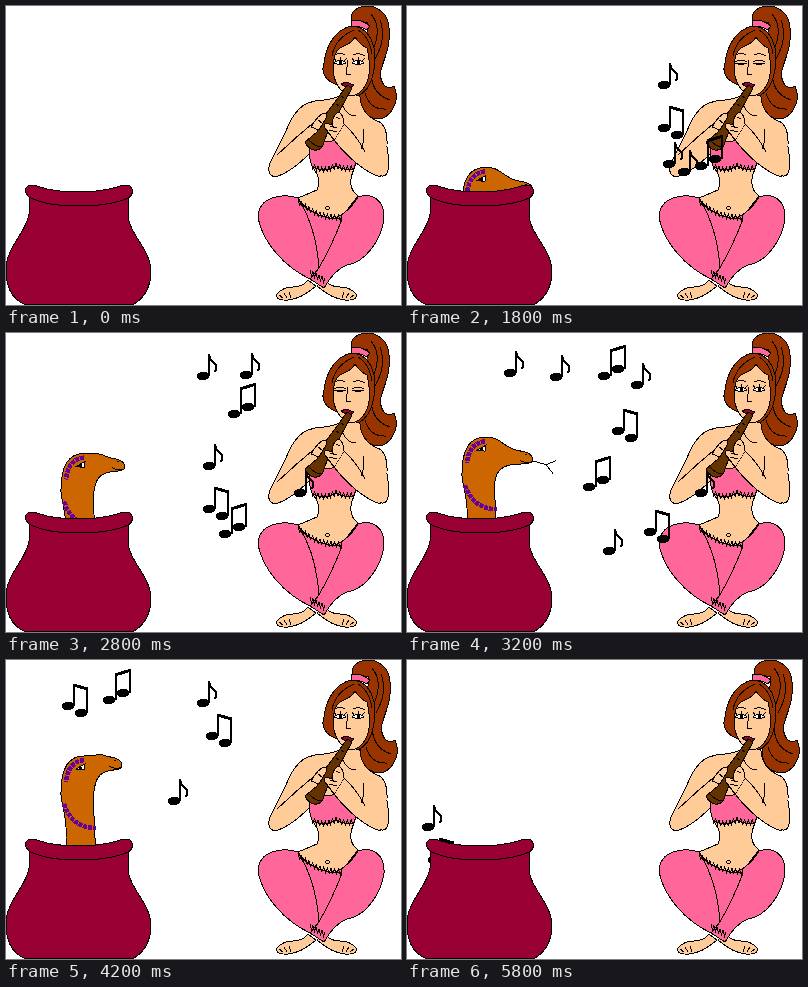
Write an HTML page that moves like this. It is 395 px wide and 299 px high and loops after 6000 ms.

```html
<!DOCTYPE html>
<html lang="en">
<head>
<meta charset="utf-8">
<title>Snake charmer</title>
<style>
  html, body { margin: 0; width: 100%; height: 100%; overflow: hidden; background: #fff; }
  svg { display: block; width: 100%; height: 100%; }
  path, ellipse, circle { stroke: #000; shape-rendering: crispEdges; }
  .skin { fill: #fc9; }
  .pink { fill: #f69; }
  .hair { fill: #930; }
  .wood { fill: #630; }
  .pot { fill: #903; }
  .snake { fill: #c60; }
  .white { fill: #fff; }
  .line { fill: none; }
  .strand { fill: none; stroke: #609; stroke-width: 4.5; stroke-dasharray: 4 1; }
  .note path { fill: none; stroke-width: 2; }
  .note .beam { stroke-width: 3; }
</style>
</head>
<body>
<svg viewBox="0 0 395 299" preserveAspectRatio="none">
  <defs>
    <ellipse id="head" rx="6" ry="3.8" transform="rotate(-8)"/>
    <g id="single" class="note">
      <use href="#head"/>
      <path d="M6 0V-22Q7 -15 11 -13T12 -4"/>
    </g>
    <g id="down" class="note">
      <use href="#head"/><use href="#head" x="13" y="7"/>
      <path d="M6 0V-21M19 7V-18"/><path class="beam" d="M5 -21L20 -17"/>
    </g>
    <g id="up" class="note">
      <use href="#head"/><use href="#head" x="14" y="-7"/>
      <path d="M7 0V-25M21 -7V-30"/><path class="beam" d="M6 -25L22 -30"/>
    </g>
    <g id="foot">
      <path class="skin" d="M0 0Q-5 7 -15 7T-31 14Q-33 21 -20 20T8 6Z"/>
      <path class="line" d="M-29 15l4 3M-24 13l3 5M-19 12l2 6"/>
    </g>
    <g id="eye">
      <path class="white" d="M-6 1Q0 -5 6 1Q0 4 -6 1Z"/>
      <path d="M-1 -1h2v2h-2Z"/>
      <path class="line" d="M-4 -1l-2 -3M0 -2v-3M4 -1l3 -3"/>
    </g>
    <g id="lid"><path class="line" d="M-6 0Q0 5 6 0M-5 1l-2 2M0 3v2M5 1l2 2"/></g>
    <g id="sleepy"><path class="white" d="M-6 1H6Q0 4 -6 1Z"/><path class="line" d="M-6 0Q0 -4 6 0"/></g>
  </defs>

  <g id="tail">
    <path class="hair" d="M346 14C343 5 353 0 362 0S383 8 383 22C385 42 377 54 374 68Q377 86 388 80C394 92 388 108 375 113Q356 113 353 94L356 40Q362 28 362 17Z"/>
    <path class="line" d="M365 8Q377 22 366 46M374 14Q381 32 369 53M365 62Q364 88 384 94M359 87Q364 104 380 103"/>
  </g>

  <path class="skin" d="M337 84Q339 91 318 94Q300 95 293 103Q284 113 280 125L264 157Q260 169 269 171Q284 167 303 148L308 163Q316 174 311 184L292 192Q306 213 334 213L352 190Q340 181 348 163L352 149Q368 171 377 170T381 141Q382 118 371 115Q352 106 354 84Z"/>
  <path class="line" d="M271 149Q291 130 312 113M303 148L313 136M337 100Q341 110 350 110"/>
  <circle class="skin" cx="321.500" cy="202" r="1.800"/>
  <path class="pink" d="M306 132Q318 138 330 134Q345 141 351 133Q353 152 348 163Q338 165 330 160Q317 168 306 160Q301 148 306 132Z"/>
  <path class="skin" d="M375 171C360 167 342 152 328 134L338 118Q351 130 359 146"/>
  <path class="line" d="M357 123Q359 136 355 143"/>

  <use href="#foot" x="302" y="274"/>
  <use href="#foot" transform="translate(319 274) scale(-1 1)"/>
  <path class="pink" d="M352 191C366 186 379 194 378 213C375 234 360 256 341 259Q328 264 318 282L304 273L330 212Q344 205 352 191Z"/>
  <path class="pink" d="M292 192C277 187 252 190 252 212C258 240 281 262 304 273L313 262C312 242 306 214 292 192Z"/>
  <path class="pink" d="M294 196Q310 213 336 213Q328 235 313 262Q310 221 294 196Z"/>

  <g id="frills"></g>

  <path class="hair" d="M346 20C329 23 320 40 318 57Q314 69 325 76L352 90C368 82 370 60 368 42Q363 21 346 20Z"/>
  <path class="pink" d="M345 15Q354 12 364 20L361 24Q352 19 345 21Z"/>
  <path class="skin" d="M328 70Q325 46 336 41Q346 37 349 31Q354 39 361 42C365 60 364 76 356 84Q347 94 338 87Q330 80 328 70Z"/>
  <path class="line" d="M329 49Q334 46 339 49M347 49Q353 46 359 50M342 54L340 68L345 69M348 24Q329 32 326 50M352 24Q363 30 366 48"/>
  <use class="lids" href="#eye" x="334" y="56"/>
  <use class="lids" href="#eye" x="352" y="56"/>
  <path class="pot" d="M335 78L340 76L348 79Q343 85 335 78Z"/>

  <path class="wood" d="M341 79L346 82L333 106L323 122L317 139Q314 145 308 144T299 136Q306 130 311 126L317 112L329 96Z"/>
  <path class="line" d="M335 90l3 2M330 98l3 2M302 133Q308 140 315 141"/>
  <path class="skin" d="M305 121Q312 109 318 107Q323 109 319 114L313 124Z"/>
  <path class="skin" d="M338 118Q338 108 332 106Q326 110 326 119Q316 115 319 122L328 134"/>
  <path class="line" d="M312 114l4 3M324 120l7 2M323 124l8 2M330 111l4 2"/>

  <g id="notes"></g>
  <g id="snake">
    <path class="snake"/>
    <path class="strand"/>
    <path class="strand"/>
    <path class="white"/>
    <path/>
    <path class="line"/>
  </g>
  <path class="pot" d="M23 190V208C20 228 0 240 0 264Q0 290 18 298H128Q145 288 145 264C144 242 122 228 122 207V190Z"/>
  <path class="pot" d="M22 180C31 176 32 186 72 186S114 176 124 180Q130 187 122 192Q104 200 72 200T23 191Q16 184 22 180Z"/>
</svg>
<script>
const $ = id => document.getElementById(id);
const LOOP = 6000, STEP = 200;
const clamp = v => Math.max(0, Math.min(1, v));

function add(parent, tag, attrs) {
  const node = document.createElementNS("http://www.w3.org/2000/svg", tag);
  for (const name in attrs) node.setAttribute(name, attrs[name]);
  return parent.appendChild(node);
}

// A zigzag hem from one point to another, sagging in the middle.
function frill(x0, y0, x1, y1, sag, count) {
  let d = "M";
  for (let i = 0; i <= count; i++) {
    const u = i / count;
    const x = x0 + (x1 - x0) * u;
    const y = y0 + (y1 - y0) * u + sag * Math.sin(Math.PI * u) + (i % 2 ? 5 : 0);
    d += `${x.toFixed(1)} ${y.toFixed(1)} `;
  }
  add($("frills"), "path", { class: "line", d });
}
frill(292, 193, 336, 209, 5, 24);
frill(305, 157, 330, 157, 4, 14);
frill(330, 157, 349, 159, 2, 10);
frill(304, 264, 319, 272, 0, 10);

// Key points two steps apart, from the flute over the top and into the pot.
const route = [[294, 160], [236, 184], [203, 133], [230, 52], [149, 44], [62, 46], [20, 125], [27, 200]];
const KINDS = { s: "single", d: "down", u: "up" };

// One letter per step; a dash is a rest.
const notes = [..."sdssusdu-sds"].map((letter, i) => ({
  node: add($("notes"), "use", { href: "#" + KINDS[letter] }),
  start: i + 1,
  life: letter === "-" ? 0 : i < 2 ? 7 : i < 6 ? 10 : 15
}));

// Catmull-Rom curve through the route.
function routeAt(age) {
  const i = Math.floor(age / 2), u = age / 2 - i;
  const at = n => route[Math.max(0, Math.min(route.length - 1, n))];
  const [a, b, c, d] = [at(i - 1), at(i), at(i + 1), at(i + 2)];
  return [0, 1].map(j => b[j] + u / 2 * (c[j] - a[j]
    + u * (2 * a[j] - 5 * b[j] + 4 * c[j] - d[j] + u * (3 * (b[j] - c[j]) + d[j] - a[j]))));
}

const show = (node, on) => node.setAttribute("visibility", on ? "visible" : "hidden");
const move = (node, x, y) => node.setAttribute("transform", `translate(${Math.round(x)} ${Math.round(y)})`);

function drawNotes(k) {
  for (const { node, start, life } of notes) {
    const age = k - start, on = age >= 0 && age < life;
    show(node, on);
    if (!on) continue;
    // Later notes swing wider to the lower left before they climb.
    const swing = age < 7 ? 11 * (start - 6) * Math.sin(Math.PI * age / 7) : 0;
    const [x, y] = routeAt(age);
    move(node, x - swing, y + swing);
  }
}

function drawSnake(k) {
  const rise = Math.min(clamp((k - 2) / 11), clamp((22 - k) / 4));
  show($("snake"), rise > 0);
  const top = 186 - 90 * rise;
  const nod = 11 + 7 * Math.cos((k - 12.5) * Math.PI / 4);
  const y = top + nod, x = 112 + 0.75 * nod;
  const tongue = k % 4 === 0 && rise > 0.5;
  const parts = [
    `M60 240V${top + 82}C62 ${top + 62} 54 ${top + 45} 55 ${top + 36}C55 ${top + 14} 62 ${top} 78 ${top}`
      + `C94 ${top - 1} 96 ${y - 7} ${x - 14} ${y - 4}Q${x + 3} ${y - 2} ${x} ${y + 7}`
      + `C${x - 5} ${y + 11} 105 ${y + 8} 98 ${y + 12}C82 ${y + 18} 89 ${top + 60} 89 ${top + 82}V240`,
    `M78 ${top + 4}Q62 ${top + 6} 60 ${top + 26}`,
    `M58 ${top + 48}Q66 ${top + 72} 90 ${top + 72}`,
    `M70 ${top + 13}l9 -5l-1 6z`,
    `M73 ${top + 11}h2v2h-2z`,
    `M${x - 7} ${y}h2M${x} ${y + 7}q-6 2 -12 -1` + (tongue ? `m12 0l14 4l10 -4m-10 4l7 9` : "")
  ];
  [...$("snake").children].forEach((part, i) => part.setAttribute("d", parts[i]));
}

function draw(time) {
  const k = Math.max(0, Math.floor(time % LOOP / STEP) - 4);
  const lids = k > 6 && k < 10 ? "#lid" : k > 3 && k < 12 ? "#sleepy" : "#eye";
  document.querySelectorAll(".lids").forEach(eye => eye.setAttribute("href", lids));
  move($("tail"), Math.max(0, k - 13) / 5, 0);
  drawNotes(k);
  drawSnake(k);
}

const began = performance.now();
function tick() {
  draw(performance.now() - began);
  requestAnimationFrame(tick);
}
tick();
</script>
</body>
</html>
```
